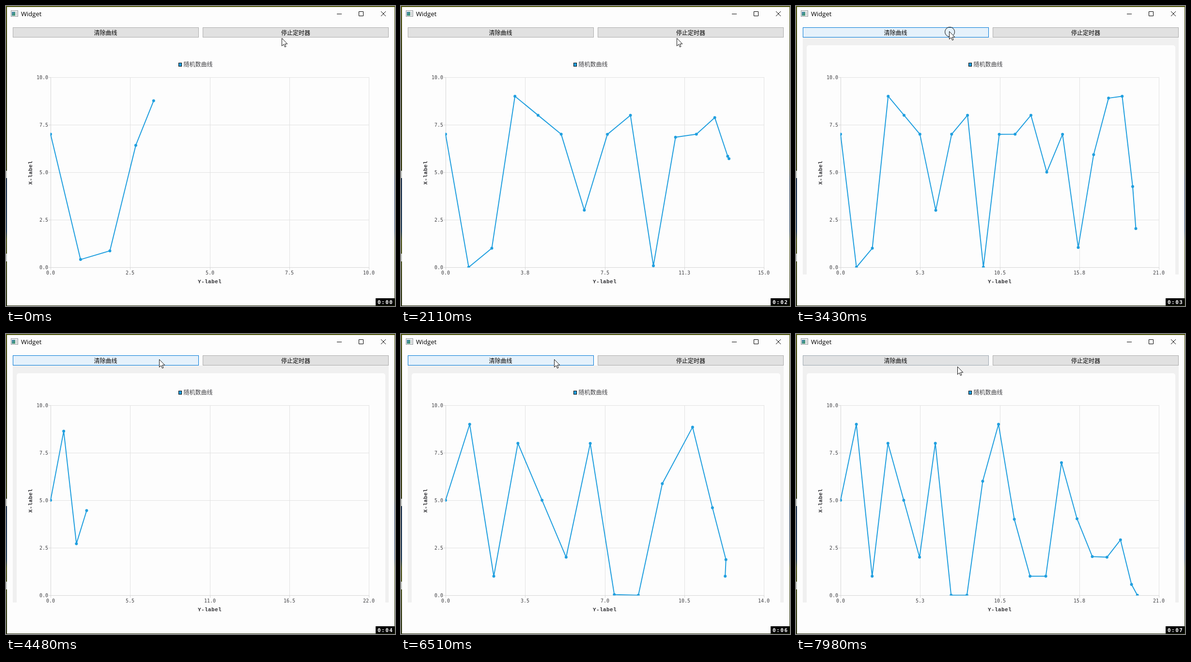
An HTML page for the animation above (8 s loop, 803 by 619 pixels).

```html
<!DOCTYPE html>
<html lang="zh-CN">
<head>
<meta charset="utf-8">
<title>Widget</title>
<style>
html, body { margin: 0; width: 100%; height: 100%; overflow: hidden; background: #fdfdfd; }
svg { display: block; width: 803px; height: 619px; }
.cjk { font: 12px "Noto Sans CJK SC", "Noto Sans CJK", sans-serif; text-anchor: middle; }
.tick { font: 10px "DejaVu Sans Mono", monospace; fill: #404044; }
.axis { font: bold 11px "Liberation Mono", monospace; letter-spacing: .4px; text-anchor: middle; fill: #2c2c30; }
</style>
</head>
<body>
<svg viewBox="0 0 803 619">
  <defs>
    <linearGradient id="desk" x2="0" y2="1">
      <stop offset="0" stop-color="#4c5205"/><stop offset=".2" stop-color="#1e2400"/>
      <stop offset=".54" stop-color="#2b3000"/><stop offset=".58" stop-color="#0d2440"/>
      <stop offset=".75" stop-color="#12304c"/><stop offset=".78" stop-color="#4a5213"/>
      <stop offset="1" stop-color="#222a08"/>
    </linearGradient>
    <linearGradient id="app" x2="1" y2="1">
      <stop offset="0" stop-color="#4a86b8"/><stop offset="1" stop-color="#3f9a62"/>
    </linearGradient>
    <clipPath id="plotClip"><rect x="91.5" y="146.5" width="658" height="393"/></clipPath>
    <clipPath id="frameClip"><rect id="frameBox" y="65" height="489"/></clipPath>
  </defs>

  <rect width="803" height="619" fill="url(#desk)"/>
  <path d="M0 340h2v15h-2zM0 511h2v16h-2z" fill="#c9ccc8"/>
  <rect x="2" y="2" width="800" height="616" fill="#fdfdfd"/>

  <rect x="10.5" y="9.5" width="14" height="12" fill="#f4f4f4" stroke="#8d9297"/>
  <rect x="12" y="12" width="7" height="8" fill="url(#app)"/>
  <rect x="20" y="12" width="3" height="8" fill="#d3d6d8"/>
  <text x="31" y="21" font-family="Open Sans, sans-serif" font-size="13">Widget</text>
  <path d="M683 16.5h10M728.5 11.5h9v9h-9zM774 11l10 10M784 11l-10 10" fill="none" stroke="#000"/>

  <g clip-path="url(#frameClip)">
    <rect x="14" y="65" width="776" height="489" fill="#f0f0f0"/>
    <rect x="22" y="81" width="761" height="500" rx="5" fill="#fdfdfd"/>
  </g>

  <rect id="clearBtn" x="14.5" y="44.5" width="383" height="20"/>
  <rect x="406.5" y="44.5" width="383" height="20" fill="#e1e1e1" stroke="#adadad"/>
  <text class="cjk" x="205.5" y="59.5">清除曲线</text>
  <text class="cjk" x="598" y="59.5">停止定时器</text>

  <rect x="356.5" y="117.5" width="6" height="7" fill="#209fdf" stroke="#000"/>
  <text class="cjk" x="396.5" y="125" fill="#404044">随机数曲线</text>

  <g id="grid"></g>
  <text class="axis" x="420.5" y="572">Y-label</text>
  <text class="axis" transform="translate(54 344) rotate(-90)">X-label</text>

  <g clip-path="url(#plotClip)" fill="#209fdf">
    <path id="line" fill="none" stroke="#209fdf" stroke-width="2" stroke-linejoin="bevel"/>
    <path id="dots"/>
  </g>

  <circle id="ring" cx="317.5" cy="53.5" r="10" fill="none" stroke="#000"/>
  <path id="cursor" d="M.5 .5V16.5L4.2 13L6.6 18.6L9 17.6L6.7 12.2H11.8Z" fill="#fff" stroke="#111"/>

  <rect x="763" y="603" width="39" height="15" fill="#000"/>
  <text id="clock" x="767" y="614.5" fill="#fff" font-family="DejaVu Sans Mono, monospace" font-size="11" font-weight="bold" letter-spacing="1.5"></text>
</svg>
<script>
const LOOP = 8000, X0 = 92, Y0 = 539, W = 657, H = 392;
const EASE_MS = 1080, RESTART = 22, LAST_TICK = 42, CLEAR_AT = 3600;
const VALUES = [
  [7,0,1,9,8,7,3,7,8,0,7,7,8,5,7,1,6,9,9,3,1,4],
  [5,9,1,8,5,2,8,0,0,6,9,4,1,1,7,4,2,2,3,0,0]
];
// [tick number, ms]: the timer drifts a little between these
const BEATS = [[4,-70],[11,1391],[17,2605],[20,3267],[30,5357],[35,6419],[42,7769]];
// [ms, x, y]
const MOVES = [[0,569,66],[2200,569,66],[2730,369,90],[3130,316,52],[7560,316,52],[7760,333,67],[LOOP,333,67]];

const $ = id => document.getElementById(id);
const clamp = v => Math.max(0, Math.min(1, v));
const mix = (a, b, k) => a + (b - a) * k;
const rgb = (a, b, k) => `rgb(${a.map((v, i) => Math.round(mix(v, b[i], k)))})`;

function along(keys, at) {
  let i = 1;
  while (i < keys.length - 1 && keys[i][0] < at) i++;
  const a = keys[i - 1], b = keys[i], k = (at - a[0]) / (b[0] - a[0]);
  return a.slice(1).map((v, j) => mix(v, b[j + 1], k));
}
const tickTime = n => along(BEATS, n)[0];

// Each tick appends a point and restarts an out-quart ease from the current pose.
function chartAt(t) {
  let pts = [], goal = [], axis = 10, last = tickTime(0);
  const ease = now => {
    const left = (1 - clamp((now - last) / EASE_MS)) ** 4;
    pts = pts.map((p, i) => p.map((v, j) => mix(goal[i][j], v, left)));
  };
  for (let n = 0; n <= LAST_TICK && tickTime(n) <= t; n++) {
    ease(tickTime(n));
    last = tickTime(n);
    if (n === RESTART) pts = [];
    const run = n < RESTART ? 0 : 1, k = n - run * RESTART;
    if (k + 1 > 10) axis = k + 1;
    goal = VALUES[run].slice(0, k + 1).map((v, i) => [X0 + i * W / axis, Y0 - v * H / 10]);
    pts.push(goal[Math.max(0, k - 1)]);
  }
  ease(t);
  if (t >= CLEAR_AT && t < tickTime(RESTART)) pts = [];
  return { pts, axis };
}

function buildGrid() {
  let lines = "", ticks = "", text = "";
  for (let i = 0; i < 5; i++) {
    const x = Math.round(X0 + i * W / 4) + .5, y = Y0 - i * H / 4 + .5;
    lines += `M${x} 147V539M92 ${y}H750`;
    ticks += `M${x} 540v4M88 ${y}h4`;
    text += `<text class="tick" x="87" y="${y + 3.5}" text-anchor="end">${(i * 2.5).toFixed(1)}</text>` +
      `<text class="tick" id="x${i}" x="${x - .5}" y="554" text-anchor="middle"></text>`;
  }
  $("grid").innerHTML = `<path d="${lines}" stroke="#e2e2e2"/>` +
    `<path d="${ticks}M92.5 147V540M92 539.5H750" stroke="#d6d6d6" fill="none"/>${text}`;
}

function draw(t) {
  const { pts, axis } = chartAt(t);
  const xy = pts.map(p => p.map(v => v.toFixed(2)));
  $("line").setAttribute("d", xy.length ? "M" + xy.join("L") : "");
  $("dots").setAttribute("d", xy.map(([x, y]) => `M${x} ${y}m-3 0a3 3 0 1 0 6 0a3 3 0 1 0-6 0`).join(""));
  for (let i = 0; i < 5; i++) $("x" + i).textContent = (axis * i / 4).toFixed(1);

  const left = t < 2990 ? 92 : 14;
  $("frameBox").setAttribute("x", left);
  $("frameBox").setAttribute("width", t < 2200 ? 0 : 790 - left);

  const hover = clamp((t - 2990) / 150) * clamp((8010 - t) / 310);
  $("clearBtn").setAttribute("fill", rgb([225, 225, 225], [229, 241, 251], hover));
  $("clearBtn").setAttribute("stroke", rgb([173, 173, 173], [0, 120, 215], hover));

  $("cursor").setAttribute("transform", `translate(${along(MOVES, t).map(Math.round)})`);
  $("ring").setAttribute("visibility", t >= 3430 && t < 3560 ? "visible" : "hidden");
  $("clock").textContent = "0:0" + Math.floor(t / 1000);
}

buildGrid();
const start = performance.now();
function loop() {
  draw((performance.now() - start) % LOOP);
  requestAnimationFrame(loop);
}
loop();
</script>
</body>
</html>
```
